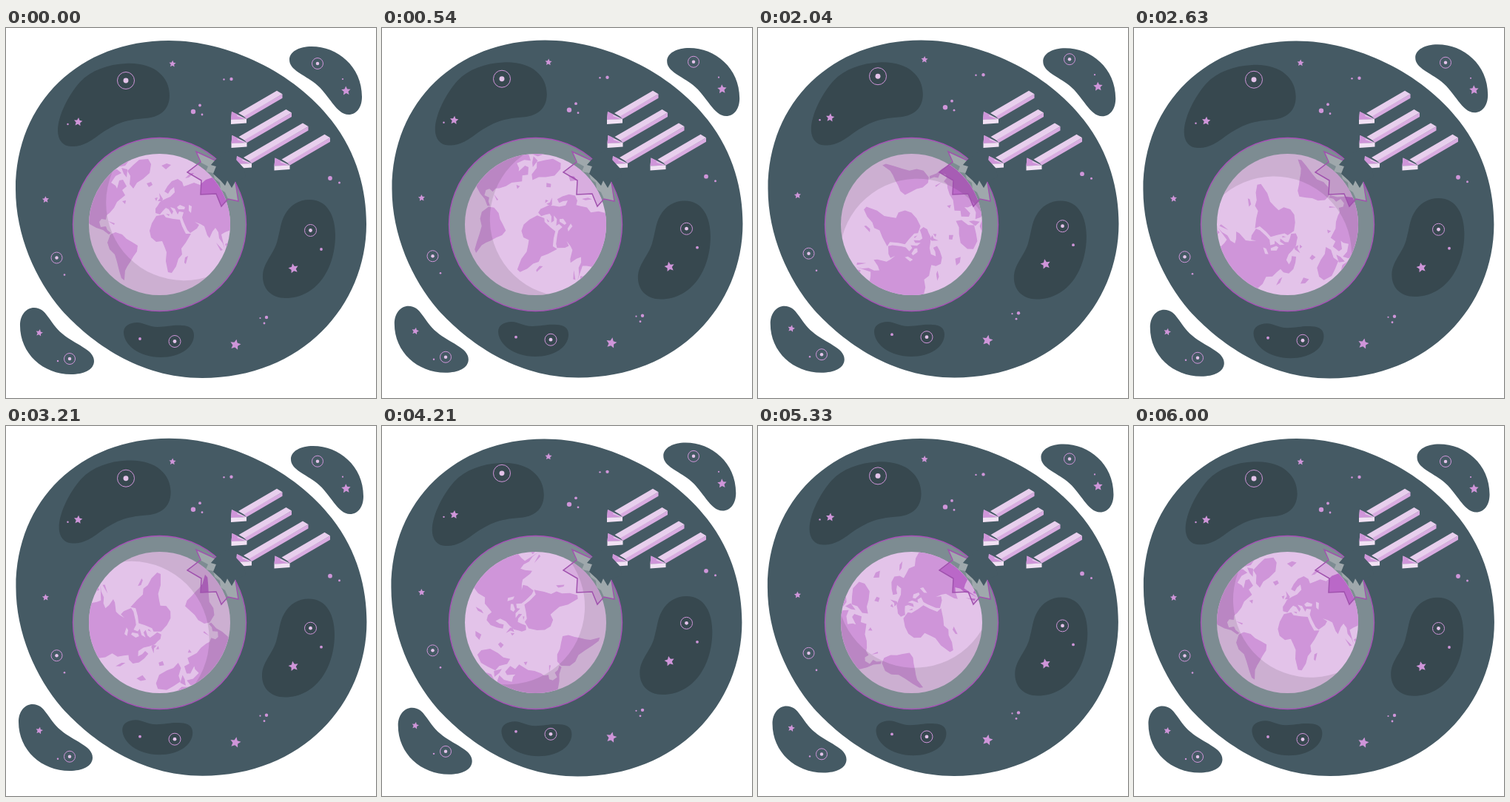
An HTML page that plays this animation: 500 px wide and 500 px high, repeating every 6040 ms.

```html
<!DOCTYPE html>
<html>
<head>
<meta charset="utf-8">
<style>
html, body { margin: 0; width: 100%; height: 100%; overflow: hidden; background: #fff; }
svg { display: block; width: 100vw; height: 100vh; }
.dark { fill: #37484f; }
.main { fill: #455a64; }
.sea { fill: var(--sea); }
.land { fill: var(--land); }
</style>
</head>
<body>
<svg viewBox="0 0 500 500">
  <defs>
    <clipPath id="disc"><circle cx="207.5" cy="265.5" r="95.5"/></clipPath>
    <clipPath id="hole"><path d="M257 167 263 181 245 195 264 206 263 225 284 224 291 241 300 231 314 234 311 209 283 179Z"/></clipPath>
  </defs>

  <path class="main" data-drift=".6,-.5" d="M220 17C300 17 390 60 440 125C475 170 487 220 487 265C487 375 400 473 265 473C180 473 115 425 75 381C40 340 13 280 13 218C13 100 100 17 220 17Z"/>
  <path class="dark" data-drift="2.3,-2" d="M162 48C200 46 221 66 221 91C221 112 206 121 188 122C160 124 145 130 121 148C104 160 96 160 88 160C77 160 70 151 70 139C70 118 85 90 100 73C115 57 138 49 162 48Z"/>
  <path class="dark" data-drift="-1.4,2" d="M410 232C435 232 445 255 445 280C445 325 420 365 378 365C358 365 347 352 347 336C347 318 360 308 366 290C371 272 371 262 377 252C384 239 396 232 410 232Z"/>
  <path class="dark" data-drift="-2.5,-1.2" d="M177 398C187 398 192 404 205 404C218 404 225 401 238 402C248 402 254 407 254 415C254 432 235 445 209 445C180 445 159 428 159 411C159 403 167 398 177 398Z"/>
  <path class="main" data-drift="-2.8,-2.8" d="M38 378C55 378 58 398 76 413C93 428 119 434 119 450C119 462 105 468 88 468C50 468 19 440 19 402C19 388 27 378 38 378Z"/>
  <path class="main" data-drift="2.8,2.7" d="M413 25C396 25 383 32 383 43C383 57 403 63 418 75C437 90 446 117 463 117C474 117 481 107 481 93C481 52 448 25 413 25Z"/>

  <g id="sky"></g>
  <g id="arrows"></g>

  <circle cx="207.5" cy="265.5" r="117" fill="#7d8c92" stroke="#a94fb9" stroke-width="1.3"/>
  <g style="--sea:#e3c3e9;--land:#cf95d9">
    <g id="globe" clip-path="url(#disc)">
      <g id="spin">
        <circle class="sea" cx="207.5" cy="265.5" r="97"/>
        <!-- Africa, Madagascar -->
        <path class="land" d="M203 254 213 252 216 256 226 258 235 259 238 268 243 278 250 278 243 290 237 298 238 306 233 312 230 322 224 331 219 330 216 315 217 303 214 295 211 288 203 289 196 283 194 274 197 264ZM246 308 243 319 241 317 242 310Z"/>
        <!-- Americas -->
        <path class="land" d="M141 279 148 276 157 279 163 285 170 289 178 294 177 302 172 309 168 316 164 322 161 328 160 341 156 338 153 328 150 316 147 306 140 299 137 290Z"/>
        <path class="land" d="M108 258 118 230 128 205 140 192 150 191 156 196 148 200 142 209 148 213 150 217 153 206 158 205 163 214 157 219 161 226 150 235 146 243 140 250 136 253 135 259 129 258 126 262 128 269 135 268 137 273 142 277 139 279 131 273 122 270 113 265ZM157 234 162 233 161 238ZM138 261 147 264 146 266ZM150 188 155 182 167 178 161 186ZM156 189 164 191 163 202 159 197Z"/>
        <!-- Greenland and northern islands -->
        <path class="land" d="M172 185 180 178 192 177 196 184 194 196 185 204 177 209 172 217 167 211 168 200 164 193ZM190 210 196 208 198 212 193 215ZM210 186 217 183 223 185 216 191ZM242 203 248 197 254 196 247 202ZM207 223 212 231 211 234 205 234 208 230ZM201 230 205 229 203 234Z"/>
        <!-- Eurasia -->
        <path class="land" d="M202 244 202 250 208 252 212 247 216 243 220 245 224 252 226 248 222 242 228 244 232 252 234 248 240 249 238 256 240 262 245 273 249 277 258 271 261 266 255 262 263 265 268 268 272 280 275 284 279 275 283 270 287 276 288 284 293 291 296 300 291 279 296 276 306 272 312 250 300 225 285 200 270 205 262 212 254 209 246 212 240 214 238 208 232 204 224 207 218 214 214 221 219 224 222 219 227 215 228 222 222 228 215 231 208 235 205 240ZM284 290 293 300 290 301ZM296 292 303 289 300 300ZM216 251 221 252 220 254Z"/>
        <path class="sea" d="M231 242 235 239 242 242 241 245 233 245ZM247 239 251 241 250 250 247 247Z"/>
        <path fill="#000" opacity=".1" fill-rule="evenodd" d="M110 265.5a97.5 97.5 0 1 0 195 0a97.5 97.5 0 1 0-195 0ZM135.2 236.1a105 105 0 1 0 210 0a105 105 0 1 0-210 0Z"/>
      </g>
    </g>
  </g>
  <g clip-path="url(#hole)" style="--sea:#d8addf;--land:#ba68c8"><use href="#globe"/></g>

  <!-- broken rim -->
  <path fill="#9fa8ac" d="M257 167 283 179 277 185 284 187 280 197 290 206 296 213 299 206 305 216 310 208 314 234 300 231 296 222 290 218 289 209 282 204 280 196 270 194 273 187 262 181Z"/>
  <path fill="none" stroke="#a052ae" stroke-width="1.5" d="M283 179 257 167 263 181 245 195 264 206 263 225 284 224 291 241 300 231 314 234 310 208"/>
  <path class="main" d="M283 178 277 185 284 187 280 197 290 206 296 213 299 206 305 216 310 207 324 202 322 190 300 166Z"/>
</svg>
<script>
const $ = id => document.getElementById(id);
const TAU = Math.PI * 2, LOOP = 6040;

const dot = (x, y, r, fill = '#cf95d9') => `<circle cx="${x}" cy="${y}" r="${r}" fill="${fill}"/>`;
const ring = (x, y, r) =>
  `<circle cx="${x}" cy="${y}" r="${r}" fill="none" stroke="#cf95d9"/>` + dot(x, y, r * .3, '#e3c3e9');
const poly = (pts, fill) => `<polygon points="${pts.join(' ')}" fill="${fill}"/>`;

function star(x, y, r, tilt) {
  const pts = [];
  for (let i = 0; i < 10; i++) {
    const a = i * TAU / 10 - TAU / 4 + tilt, d = i % 2 ? r * .48 : r;
    pts.push([x + d * Math.cos(a), y + d * Math.sin(a)]);
  }
  return poly(pts, '#cf95d9');
}

// (x, y) is the left corner of the arrow head, len the width of the shaft
function arrow(x, y, len) {
  const h = len * .58;
  const face = (fill, ...pts) => poly(pts.map(([a, b]) => [x + a, y + b]), fill);
  return face('#d9ace1', [17, -5], [17.5 + len, -4.5 - h], [17.5 + len, 1 - h], [21, -1]) +
    face('#e3c3e9', [1, -11], [21, -1], [0, 0]) +
    face('#e8cfed', [10, -9], [10 + len, -9 - h], [17.5 + len, -4.5 - h], [17.5, -4.5]) +
    face('#cf95d9', [1, -11], [9, -7], [8, -5], [19, -1], [0, 0]) +
    face('#f1e1f4', [0, 0], [21, -1], [21, 4.5], [0, 6]);
}

$('sky').innerHTML = [
  [162, 71, 11.5], [421, 48, 7.5], [411.5, 273.5, 8], [228, 423.5, 8], [68.5, 310.5, 7.5], [86, 447, 7.5]
].map(a => ring(...a)).join('') + [
  [97.5, 127, 6, .1], [225, 48.5, 4.8, .05], [459.5, 85, 6.5, -.05], [53.5, 232, 4.8, -.05],
  [388.5, 325, 7, -.2], [310, 428, 7.5, .2], [45, 412, 5, .2]
].map(a => star(...a)).join('') + [
  [83.5, 130, 1.2], [294.5, 69.5, 1.2], [304.5, 69, 2.2], [253, 113, 3.2], [262, 104.5, 1.9],
  [265, 117, 1.4], [455, 69, 1.1], [438, 203, 2.9], [450.5, 209, 1.5], [426, 299, 1.9],
  [343.5, 392, 1.1], [352, 391, 2.2], [349, 399, 1.4], [181, 420, 1.9], [79, 333.5, 1.3], [70, 450, 1.2]
].map(a => dot(...a)).join('');

$('arrows').innerHTML = [[304, 124, 52], [304.5, 156, 64], [311, 184, 80], [362.5, 186.5, 58]]
  .map(a => arrow(...a)).join('');

const blobs = [...document.querySelectorAll('[data-drift]')]
  .map(el => [el, ...el.dataset.drift.split(',').map(Number)]);

function draw(now) {
  const p = now % LOOP / LOOP;
  const sway = Math.sin(p * 4 * TAU);
  for (const [el, dx, dy] of blobs) el.setAttribute('transform', `translate(${dx * sway} ${dy * sway})`);
  $('sky').setAttribute('transform', `translate(0 ${4 * Math.cos(p * 2 * TAU) - 4})`);
  $('spin').setAttribute('transform', `rotate(${p * 360} 207.5 265.5)`);
  requestAnimationFrame(() => draw(performance.now()));
}
draw(performance.now());
</script>
</body>
</html>
```
